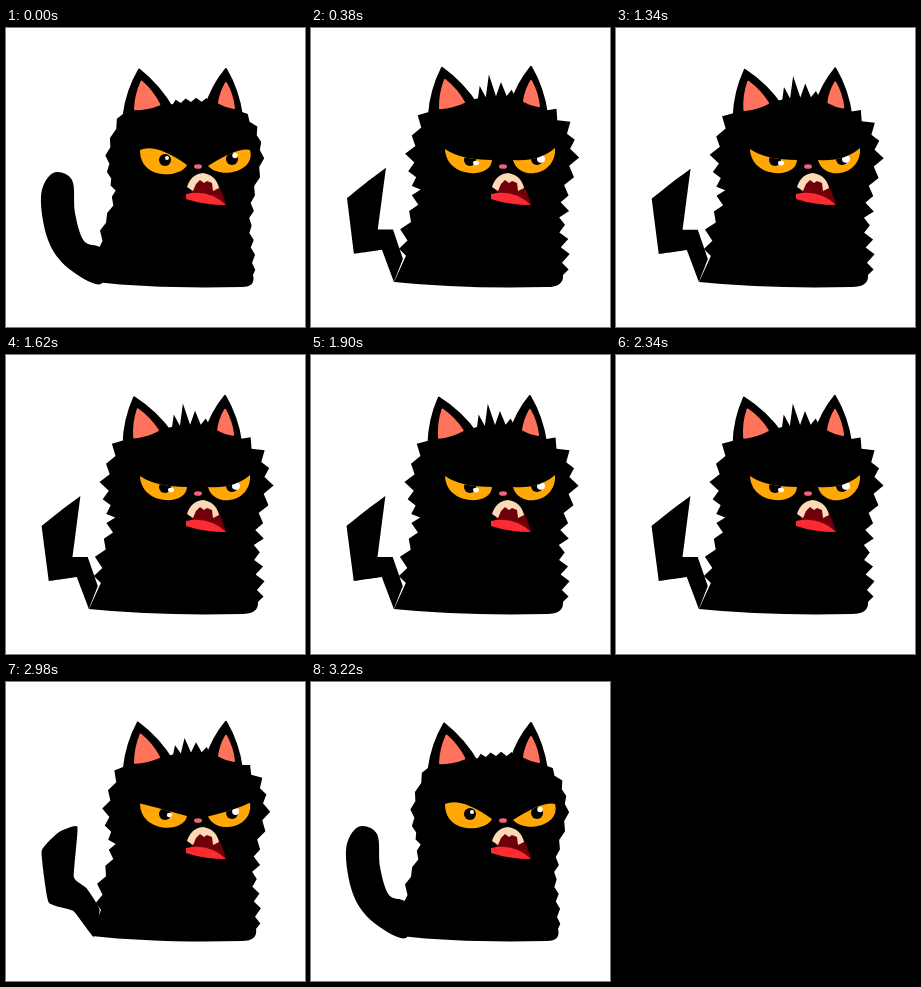
These frames come from a looping animation (299x299 px, 3400 ms). An HTML page:

```html
<!DOCTYPE html>
<html lang="en">
<head>
<meta charset="utf-8">
<title>Bristling cat</title>
<style>
html, body { margin: 0; width: 100%; height: 100%; overflow: hidden; background: #fff; }
svg { display: block; width: 100vw; height: 100vh; }
</style>
</head>
<body>
<svg viewBox="0 0 299 299">
  <defs>
    <clipPath id="clipL"><path id="lidL"/></clipPath>
    <clipPath id="clipR"><path id="lidR"/></clipPath>
  </defs>
  <g id="coat">
    <path id="tail"/>
    <path id="body"/>
    <g id="earL"></g>
    <g id="earR"></g>
  </g>
  <g clip-path="url(#clipL)">
    <rect x="130" y="110" width="56" height="42" fill="#ffa805"/>
    <circle cx="159" cy="132" r="6"/>
    <ellipse id="glintL" fill="#fff"/>
  </g>
  <g clip-path="url(#clipR)">
    <rect x="198" y="110" width="52" height="42" fill="#ffa805"/>
    <circle cx="226" cy="131" r="6"/>
    <ellipse id="glintR" fill="#fff"/>
  </g>
  <ellipse cx="192" cy="138.5" rx="4" ry="2.3" fill="#f0627e"/>
  <path fill="#6f0009" d="M183 158 Q197 140 210 153 Q216 162 220 177 L180 171 L186 165Z"/>
  <path fill="#fb2a33" d="M180 166 Q203 161 220 177 Q198 177 180 171Z"/>
  <path fill="#fbd9b5" d="M181 159 Q185 146 197 145 Q210 147 213 160 L207 163 L206 155 L201 153 L198 155 L194 152 L190 156 L187 163Z"/>
</svg>
<script>
const LOOP = 3400;
const $ = id => document.getElementById(id);
const lerp = (a, b, m) => a + (b - a) * m;
const mix = (a, b, m) => a.map((v, i) => lerp(v, b[i], m));
const ramp = (t, from, to) => {
  const x = Math.min(1, Math.max(0, (t - from) / (to - from)));
  return x * x * (3 - 2 * x);
};

function set(node, attrs) {
  for (const key in attrs) node.setAttribute(key, attrs[key]);
}

// Skin line beneath the fur, clockwise from the lower left.
const flankL = [[95, 228], [99, 198], [110, 168], [104, 145], [105, 116], [117, 86]];
const crown = [[167, 76], [185, 74], [204, 74]];
const flankR = [[236, 84], [250, 105], [254, 133], [246, 167], [243, 195], [245, 222], [247, 247]];

const tailCalm = [[66, 152], [47, 145], [35, 168], [42, 212], [62, 240], [95, 256], [96, 222], [78, 213], [69, 185]];
const tailBolt = [[75, 141], [56, 155], [36, 171], [43, 226], [71, 222], [83, 254], [92, 231], [82, 202], [67, 202]];

// Point on a Catmull-Rom curve through the keys, u from 0 to 1.
function along(keys, u) {
  const s = u * (keys.length - 1);
  const i = Math.min(keys.length - 2, Math.floor(s));
  const f = s - i;
  const at = k => keys[Math.min(keys.length - 1, Math.max(0, k))];
  return [0, 1].map(k => {
    const [a, b, c, d] = [at(i - 1)[k], at(i)[k], at(i + 1)[k], at(i + 2)[k]];
    return b + f / 2 * (c - a + f * (2 * a - 5 * b + 4 * c - d + f * (3 * (b - c) + d - a)));
  });
}

// Triangular tufts standing outward on the skin line.
function fur(keys, count, height) {
  const pts = [along(keys, 0)];
  for (let i = 0; i < count; i++) {
    const u = (i + 0.5) / count;
    const [x, y] = along(keys, u);
    const end = along(keys, (i + 1) / count);
    const start = along(keys, i / count);
    const dx = end[0] - start[0], dy = end[1] - start[1];
    const h = height(u, i) / Math.hypot(dx, dy);
    pts.push([x + dy * h, y - dx * h], end);
  }
  return pts.join(' L');
}

function bodyPath(m) {
  const tuft = (u, i) => lerp(4, 9, m) * (0.85 + 0.2 * Math.sin(i * 2.4));
  const crest = u => lerp(4, 23 * (1 - Math.abs(u - 0.4)) ** 2, m);
  const top = crown.map(([x, y]) => [x, y - 4 * m]);
  const right = flankR.map(([x, y], i) => [x + (i ? 5 * m : 0), y]);
  return `M${lerp(90, 83, m)} 254 L${fur(flankL, 9, tuft)} L${fur(top, 4, crest)} L${fur(right, 11, tuft)}` +
    ` Q${lerp(250, 253, m)} 259 236 259 Q150 261 ${lerp(90, 83, m)} 254Z`;
}

// Closed spline whose corners sharpen as the cat bristles.
function tailPath(m) {
  const pts = tailCalm.map((p, i) => mix(p, tailBolt[i], m));
  const n = pts.length;
  const bend = (1 - m) / 6;
  const at = i => pts[(i + n) % n];
  const handle = (i, sign) => at(i).map((v, k) => v + sign * bend * (at(i + 1)[k] - at(i - 1)[k]));
  return 'M' + pts[0] + pts.map((p, i) =>
    ' C' + [handle(i, 1), handle(i + 1, -1), at(i + 1)].join(' ')).join('') + 'Z';
}

// Triangle with sides bulging by a share of their length.
function earPath(corners, bulge) {
  return 'M' + corners[0] + corners.map(([x, y], i) => {
    const [p, q] = corners[(i + 1) % 3];
    return ` Q${(x + p) / 2 + (q - y) * bulge} ${(y + q) / 2 - (p - x) * bulge} ${p} ${q}`;
  }).join('') + 'Z';
}

function addEar(group, outer, inner) {
  for (const [fill, corners] of [['#000', outer], ['#ff735c', inner]]) {
    const node = document.createElementNS('http://www.w3.org/2000/svg', 'path');
    set(node, { fill, stroke: fill, 'stroke-width': 2, 'stroke-linejoin': 'round', d: earPath(corners, 0.1) });
    group.append(node);
  }
}
addEar($('earL'), [[118, 88], [131, 42], [167, 80]], [[129, 82], [134, 54], [153, 76]]);
addEar($('earR'), [[200, 78], [220, 41], [236, 88]], [[213, 75], [220, 55], [228, 80]]);

// Upper lid from corner to corner, then the round lower rim.
function eyePath(calm, angry, m) {
  const [x, y, ...p] = mix(calm, angry, m);
  return `M${x} ${y} Q${p.slice(0, 4)} C${p.slice(4)} ${x} ${y}Z`;
}

function glint(node, calm, angry, m) {
  const [cx, cy, rx, ry] = mix(calm, angry, m);
  set(node, { cx, cy, rx, ry });
}

function draw(t) {
  const m = ramp(t, 0, 380) - ramp(t, 2800, 3220);
  const sag = ramp(t, 300, 1950) - ramp(t, 2250, 3000);

  const stretch = 1 + 0.01 * m * (1 - sag);
  set($('coat'), { transform: `translate(0 257) skewX(${0.3 * sag}) scale(1 ${stretch}) translate(0 -257)` });
  set($('earL'), { transform: `rotate(${3 * (1 - m) - 3 * sag} 143 82)` });
  set($('tail'), { d: tailPath(m) });
  set($('body'), { d: bodyPath(m) });

  set($('lidL'), { d: eyePath(
    [134, 122, 150, 115, 181, 137, 175, 150, 134, 153],
    [134, 121, 150, 132, 181, 132, 180, 152, 135, 150], m) });
  set($('lidR'), { d: eyePath(
    [202, 138, 232, 119, 244, 122, 250, 143, 215, 152],
    [202, 132, 228, 134, 244, 120, 246, 148, 208, 154], m) });
  glint($('glintL'), [161, 130, 2, 2], [165, 135, 3, 2.3], m);
  glint($('glintR'), [229, 127.5, 2.7, 2.7], [230, 131, 4, 3.8], m);
}

const start = performance.now();
function tick() {
  draw((performance.now() - start) % LOOP);
  requestAnimationFrame(tick);
}
draw(0);
requestAnimationFrame(tick);
</script>
</body>
</html>
```
